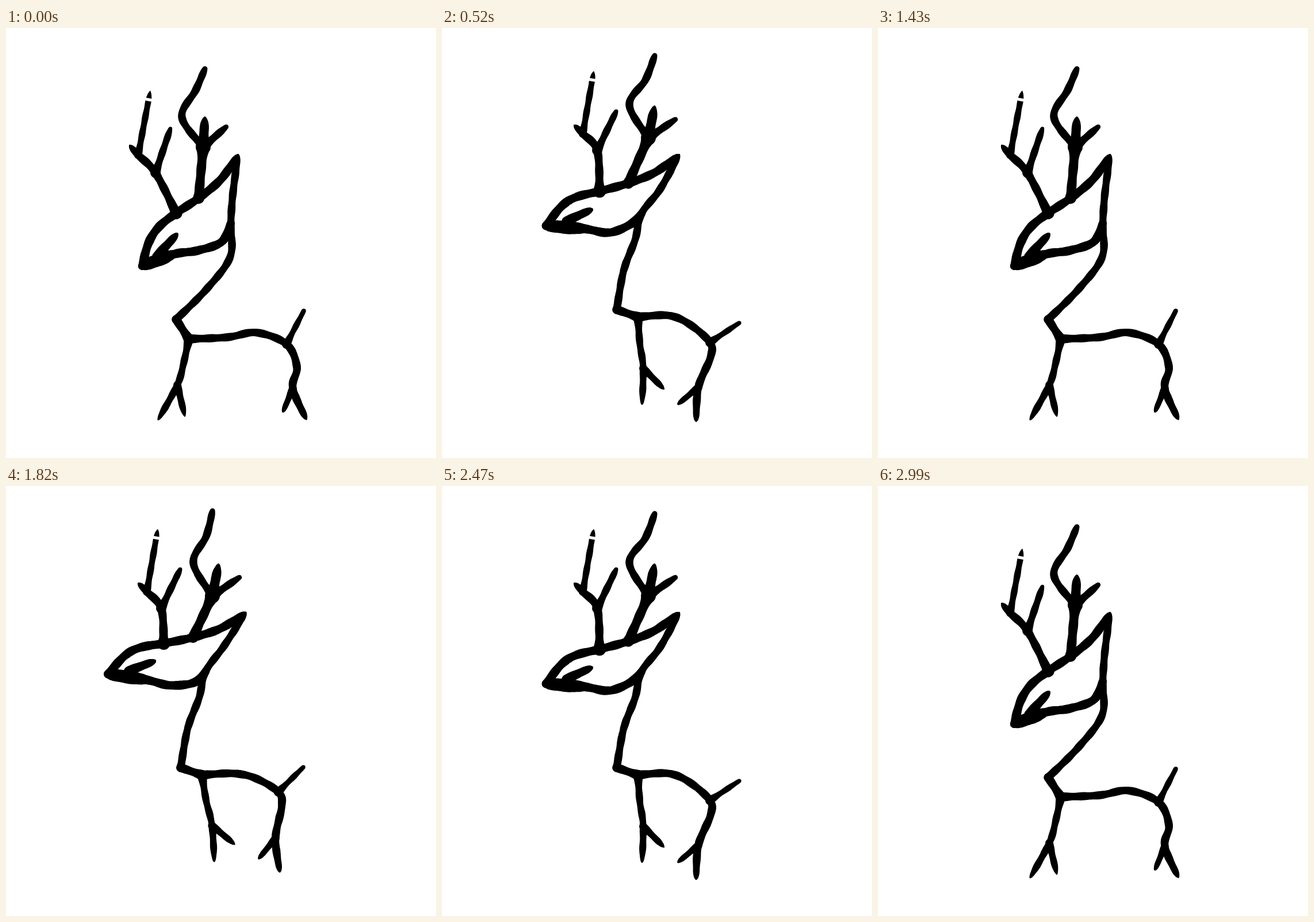
These frames come from a looping animation (748 px wide and 748 px high, 3.12 s). An HTML page with a canvas:

```html
<!DOCTYPE html>
<html>
<head>
<meta charset="utf-8">
<style>
html, body { margin: 0; width: 100%; height: 100%; overflow: hidden; background: #fff; }
canvas { display: block; }
</style>
</head>
<body>
<canvas id="stage" width="748" height="748"></canvas>
<script>
const ctx = document.getElementById('stage').getContext('2d');
const joints = {};

// Joints of one body part: x,y when bowed, then x,y when turned.
// The raised pose is the turned one swung by some degrees about a pivot.
function part(pivot, degrees, places) {
  for (const name in places) {
    const [bx, by, tx, ty] = places[name];
    joints[name] = { pivot, swing: degrees * Math.PI / 180, bowed: [bx, by], turned: [tx, ty] };
  }
}

part([0, 0], 0, {
  spur: [215, 204, 230, 169], fork: [230, 221, 245, 184], tip: [251, 109, 264, 75],
  split: [260, 252, 270, 213], tine: [286, 175, 303, 145],
  bend: [306, 155, 326, 134], crotch: [343, 207, 359, 191],
  leaf: [346, 154, 370, 135], side: [383, 172, 406, 159]
});
part([326, 134], -7, { beamTip: [346, 71, 370, 48], beam: [330, 108, 354, 90] });
part([420, 285], 4, {
  ear: [404, 220, 413, 220], crown: [374, 263, 371, 251],
  rightRoot: [335, 296, 324, 270], leftRoot: [296, 322, 274, 284],
  forehead: [266, 346, 234, 294], bridge: [248, 374, 208, 310],
  nose: [237, 414, 181, 344], chin: [290, 394, 246, 349], jaw: [334, 387, 290, 356],
  eye: [297, 359, 260, 316], eyeRoot: [262, 397, 216, 336], temple: [395, 285, 379, 281]
});
part([0, 0], 0, {
  hinge: [375, 372, 327, 342], cheek: [391, 340, 347, 323], nape: [390, 398, 336, 368],
  neck: [350, 453, 316, 422], shoulder: [296, 507, 304, 490],
  withers: [318, 541, 341, 503], saddle: [385, 538, 393, 500]
});
part([393, 500], -11, {
  loin: [436, 530, 430, 515], rump: [488, 550, 466, 547], thigh: [506, 590, 467, 573],
  hock: [499, 627, 446, 625], heel: [523, 682, 442, 685], toe: [482, 667, 411, 654],
  tail: [518, 492, 517, 513]
});
part([341, 503], -5.4, {
  shin: [309, 583, 344, 548], knee: [298, 621, 350, 592],
  hoof: [265, 681, 348, 654], frontToe: [311, 675, 386, 628]
});

// Brush strokes through joints, with start, middle and end widths
const strokes = [
  ['spur fork split leftRoot', 2, 14, 22],
  ['fork tip', 14, 11, 1],
  ['split tine', 18, 12, 7],
  ['beamTip beam bend crotch', 9, 13, 18],
  ['crotch leaf', 24, 17, 1],
  ['crotch side', 22, 13, 9],
  ['crotch rightRoot', 26, 16, 20],
  ['ear crown rightRoot leftRoot forehead bridge nose', 1, 15, 15],
  ['nose chin jaw hinge cheek', 14, 15, 14],
  ['nose chin', 13, 23, 15],
  ['eye eyeRoot', 6, 16, 16],
  ['ear temple cheek nape neck shoulder', 2, 13, 16],
  ['shoulder withers', 15, 14, 18],
  ['withers saddle loin rump thigh hock heel', 16, 13.5, 1],
  ['hock toe', 14, 11, 4],
  ['rump tail', 16, 10, 7],
  ['withers shin knee hoof', 18, 12, 3],
  ['knee frontToe', 14, 12, 3]
].map(([names, ...widths]) => ({ names: names.split(' '), widths }));

const lerp = (a, b, t) => a + (b - a) * t;

// pose 0 is bowed, 1 raised, 2 turned; beyond 2 the swing carries on
function place(name, pose) {
  const { pivot, swing, bowed, turned } = joints[name];
  const angle = swing * (2 - Math.max(1, pose));
  const c = Math.cos(angle), s = Math.sin(angle);
  const x = turned[0] - pivot[0], y = turned[1] - pivot[1];
  const rise = Math.min(1, pose);
  return [
    lerp(bowed[0], pivot[0] + x * c - y * s, rise),
    lerp(bowed[1], pivot[1] + x * s + y * c, rise)
  ];
}

// Catmull-Rom curve from b to c
const spline = (a, b, c, d, u) =>
  b + u * (c - a + u * (2 * a - 5 * b + 4 * c - d + u * (3 * (b - c) + d - a))) / 2;

function drawStroke({ names, widths: [start, middle, end] }, pose) {
  const knots = names.map(name => place(name, pose));
  const knot = i => knots[Math.max(0, Math.min(knots.length - 1, i))];
  const dots = [];
  const steps = 60, count = (knots.length - 1) * steps;
  let length = 0;
  for (let n = 0; n <= count; n++) {
    const i = Math.min(knots.length - 2, Math.floor(n / steps)), u = n / steps - i;
    const [x, y] = [0, 1].map(k =>
      spline(knot(i - 1)[k], knot(i)[k], knot(i + 1)[k], knot(i + 2)[k], u));
    const prev = dots[n - 1];
    if (prev) length += Math.hypot(x - prev.x, y - prev.y);
    dots.push({ x, y, s: length });
  }
  ctx.beginPath();
  for (const { x, y, s } of dots) {
    const width = middle + 0.7 * Math.sin(s * 0.21)
      + (start - middle) * Math.exp(-s / 8)
      + (end - middle) * Math.exp((s - length) / 8);
    const r = Math.max(0.3, width / 2);
    ctx.moveTo(x + r, y);
    ctx.arc(x, y, r, 0, 2 * Math.PI);
  }
  ctx.fill();
}

// The white nick just below the left antler's tip
function drawNick(pose) {
  const [ax, ay] = place('tip', pose), [bx, by] = place('fork', pose);
  const x = lerp(ax, bx, 0.14), y = lerp(ay, by, 0.14);
  const dx = (by - ay) * 0.09, dy = (ax - bx) * 0.09;
  ctx.beginPath();
  ctx.moveTo(x - dx, y - dy);
  ctx.lineTo(x + dx, y + dy);
  ctx.stroke();
}

function draw(pose) {
  ctx.fillStyle = ctx.strokeStyle = '#fff';
  ctx.lineWidth = 5;
  ctx.fillRect(0, 0, 748, 748);
  ctx.fillStyle = '#000';
  for (const stroke of strokes) drawStroke(stroke, pose);
  drawNick(pose);
}

// Six poses, there and back
const STEP = 130;
const start = performance.now();
let shown = -1;

function frame() {
  const n = Math.floor(Math.max(0, performance.now() - start) / STEP) % 12;
  const step = n < 6 ? n : 11 - n;
  if (step !== shown) draw((shown = step) / 2);
  requestAnimationFrame(frame);
}
frame();
</script>
</body>
</html>
```
